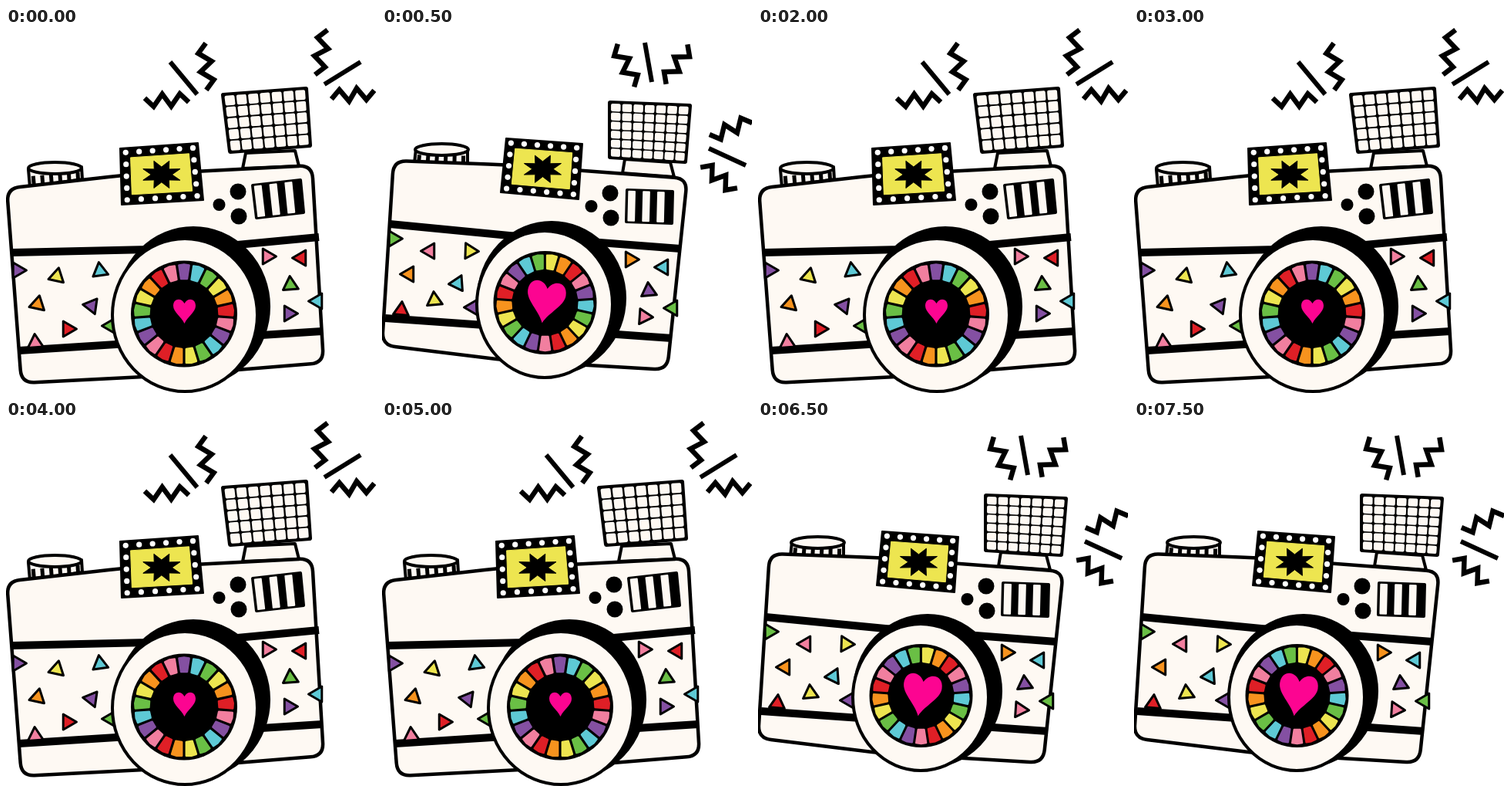
Animation of 480 by 473 pixels, one loop 8 s. Source, as an HTML page:

```html
<!DOCTYPE html>
<html>
<head>
<meta charset="utf-8">
<style>
html, body { margin: 0; width: 100%; height: 100%; overflow: hidden; background: #fff; }
svg { display: block; width: 480px; height: 473px; }
.pose { animation: flip 1s step-end infinite; }
.pose + .pose { animation-delay: -0.5s; }
@keyframes flip { 0% { visibility: visible; } 50%, 100% { visibility: hidden; } }
</style>
</head>
<body>
<svg viewBox="0 0 480 473" stroke-linejoin="round"></svg>
<script>
const INK = '#000', CREAM = '#fef9f3', HEART = '#fc0591';
const HUE = { purple: '#8450a2', blue: '#5ec9d5', green: '#6abf45', yellow: '#ede550',
              orange: '#f7931e', red: '#df1f26', pink: '#f17f9f' };
const WHEEL = Object.values(HUE);
const HEART_PATH = 'M0 16C-4 7-14.5 1-14.5-7C-14.5-17-4-18 0-10C4-18 14.5-17 14.5-7C14.5 1 4 7 0 16Z';

// Quads run clockwise from the top left; triangles are hue: [x, y, tilt].
const leaningLeft = {
  body: [[1, 208], [150, 191], [397, 178], [412, 434], [200, 451], [20, 460]],
  bands: ['8,291 185,287 300,281 406,271', '17,418 410,393'],
  neck: [[311, 162], [375, 159], [380, 179], [307, 182]],
  flash: [[282, 87], [389, 79], [394, 152], [291, 160]], rows: 5,
  dial: [[29, 183], [98, 180], [99, 196], [31, 206]],
  frame: [[148, 156], [249, 149], [256, 223], [150, 229]],
  knobs: [293, 228],
  grill: [[320, 204], [382, 197], [386, 239], [325, 246]],
  rim: [243, 361, 98, 102], lens: [232, 372, 94, 99],
  wheel: [231, 370.5, 68, 0],
  heart: 'translate(231.5 367)',
  tris: {
    purple: [[15, 314, 90], [111, 360, 38], [367, 370, 90]],
    yellow: [[66, 322, 12]],
    blue: [[122, 315, -8], [404, 354, 30]],
    orange: [[41, 358, 12]],
    red: [[80, 390, 90], [383, 298, 30]],
    green: [[136, 386, 30], [369, 333, -4]],
    pink: [[38, 408, -4], [339, 296, 90]]
  },
  bolts: [[180, 94, 237, 93, -8], [256, 20, 263, 80, -8], [414, 2, 404, 61, -8], [422, 89, 478, 84, 8]],
  rays: ['213,44 248,86', '413,73 460,44']
};

const leaningRight = {
  body: [[15, 172], [155, 177], [396, 195], [370, 443], [165, 431], [0, 411]],
  bands: ['10,254 165,269 387,286', '4,376 376,402'],
  neck: [[315, 170], [374, 174], [379, 193], [312, 188]],
  flash: [[296, 97], [399, 101], [393, 173], [296, 167]], rows: 6,
  dial: [[44, 157], [111, 158], [111, 177], [42, 175]],
  frame: [[161, 143], [260, 150], [255, 222], [154, 213]],
  knobs: [288, 230],
  grill: [[318, 210], [377, 212], [376, 253], [317, 251]],
  rim: [220, 350, 95, 98], lens: [211, 358, 88, 95],
  wheel: [211.5, 356, 66, -43],
  heart: 'translate(212 355) rotate(9) scale(1.72)',
  tris: {
    green: [[15, 273, 90], [377, 363, 30]],
    pink: [[62, 289, 30], [340, 374, 94]],
    yellow: [[114, 289, 92], [68, 353, -5]],
    orange: [[35, 319, 30], [322, 300, 90]],
    blue: [[98, 331, 26], [365, 310, 30]],
    purple: [[118, 362, 30], [346, 341, -5]],
    red: [[25, 366, 5]]
  },
  bolts: [[303, 22, 330, 75, -8], [399, 23, 366, 71, 8], [479, 120, 426, 141, -8], [415, 178, 459, 210, 8]],
  rays: ['341,19 350,70', '424,156 472,178']
};

const svg = document.querySelector('svg');
const range = n => [...Array(n).keys()];

function add(parent, tag, attrs) {
  const el = document.createElementNS('http://www.w3.org/2000/svg', tag);
  for (const k in attrs) el.setAttribute(k, attrs[k]);
  return parent.appendChild(el);
}

const mix = (a, b, k) => [a[0] + (b[0] - a[0]) * k, a[1] + (b[1] - a[1]) * k];
const at = ([a, b, c, d], u, v) => mix(mix(a, b, u), mix(d, c, u), v);
const cell = (q, u0, v0, u1, v1) => [at(q, u0, v0), at(q, u1, v0), at(q, u1, v1), at(q, u0, v1)];

// Point on an ellipse, degrees clockwise from the top.
function polar(cx, cy, deg, rx, ry = rx) {
  const a = deg * Math.PI / 180;
  return [cx + rx * Math.sin(a), cy - ry * Math.cos(a)];
}

function rounded(pts, r) {
  const n = pts.length;
  return pts.map((p, i) => {
    const [a, b] = [pts[(i + n - 1) % n], pts[(i + 1) % n]]
      .map(q => mix(p, q, r / Math.hypot(q[0] - p[0], q[1] - p[1])));
    return `${i ? 'L' : 'M'}${a}Q${p} ${b}`;
  }).join('') + 'Z';
}

function zigzag([x0, y0, x1, y1, amp], steps = 5) {
  const len = Math.hypot(x1 - x0, y1 - y0);
  return range(steps + 1).map(i => {
    const k = i / steps, off = (i % 2 ? -1 : 1) * amp * (k % 1 ? 1 : 0.4) / len;
    const [x, y] = mix([x0, y0], [x1, y1], k);
    return [x - (y1 - y0) * off, y + (x1 - x0) * off];
  }).join(' ');
}

function draw(p) {
  const g = add(svg, 'g', { class: 'pose' });
  const poly = (pts, fill, stroke = fill, width = 3) =>
    add(g, 'polygon', { points: pts.join(' '), fill, stroke, 'stroke-width': width });
  const line = (points, width, join = 'round') => add(g, 'polyline',
    { points, fill: 'none', stroke: INK, 'stroke-width': width, 'stroke-linejoin': join });
  const dot = ([cx, cy], r, fill) => add(g, 'circle', { cx, cy, r, fill });
  const oval = ([cx, cy, rx, ry], fill) =>
    add(g, 'ellipse', { cx, cy, rx, ry, fill, stroke: INK, 'stroke-width': 4 });

  for (const b of p.bolts) line(zigzag(b), 6.5, 'miter');
  for (const r of p.rays) line(r, 6);

  // flash
  poly(p.neck, CREAM, INK, 4);
  poly(p.flash, INK, INK, 6);
  for (const r of range(p.rows))
    for (const c of range(7)) {
      const u = c / 7, v = r / p.rows;
      poly(cell(p.flash, u + 0.03, v + 0.04, u + 0.113, v + 0.96 / p.rows - 0.032), CREAM, CREAM, 4);
    }

  // dial
  poly(p.dial, CREAM, INK, 4);
  for (const i of range(6)) {
    const u = 0.08 + i * 0.168;
    line([at(p.dial, u, 0.4), at(p.dial, u, 1)].join(' '), 5);
  }
  const [dx, dy] = at(p.dial, 0.5, 0);
  oval([dx, dy, 34.5, 7.5], CREAM);

  add(g, 'path', { d: rounded(p.body, 17), fill: CREAM, stroke: INK, 'stroke-width': 4.5 });
  for (const b of p.bands) line(b, 10);
  for (const hue in p.tris)
    for (const [x, y, tilt] of p.tris[hue])
      poly([0, 120, 240].map(a => polar(x, y, a + tilt, 11.5)), HUE[hue], INK, 3);

  // viewfinder
  poly(p.frame, INK, INK, 2);
  for (const i of range(6))
    for (const v of [0.08, 0.92]) dot(at(p.frame, 0.07 + i * 0.172, v), 3.6, '#fff');
  for (const i of [1, 2, 3])
    for (const u of [0.07, 0.93]) dot(at(p.frame, u, 0.08 + i * 0.21), 3.6, '#fff');
  poly(cell(p.frame, 0.13, 0.175, 0.875, 0.83), HUE.yellow, HUE.yellow, 1);
  const [sx, sy] = at(p.frame, 0.51, 0.51);
  poly(range(16).map(i => {
    const r = i % 2 ? 0.52 : 1;
    return polar(sx, sy, 22.5 * (i + 1), 26 * r, 19 * r);
  }), INK, INK, 1);

  const [kx, ky] = p.knobs;
  dot([kx + 8, ky - 16], 10.5, INK);
  dot([kx - 16.5, ky + 1], 8, INK);
  dot([kx + 9, ky + 16], 10.5, INK);
  poly(p.grill, INK, INK, 4);
  for (const i of range(3)) {
    const u = 0.04 + i * 0.32;
    poly(cell(p.grill, u, 0.04, u + 0.13, 0.96), CREAM, CREAM, 2);
  }

  // lens
  oval(p.rim, INK);
  oval(p.lens, CREAM);
  const [cx, cy, r, turn] = p.wheel;
  dot([cx, cy], r + 1, INK);
  for (const i of range(21)) {
    const a = turn + i * 360 / 21;
    const wedge = [[-6, 0.93], [0, 0.94], [6, 0.93], [5, 0.67], [-5, 0.67]]
      .map(([d, k]) => polar(cx, cy, a + d, r * k));
    poly(wedge, WHEEL[i % 7], WHEEL[i % 7], 2.5);
  }
  add(g, 'path', { d: HEART_PATH, fill: HEART, transform: p.heart });
}

draw(leaningLeft);
draw(leaningRight);
</script>
</body>
</html>
```
